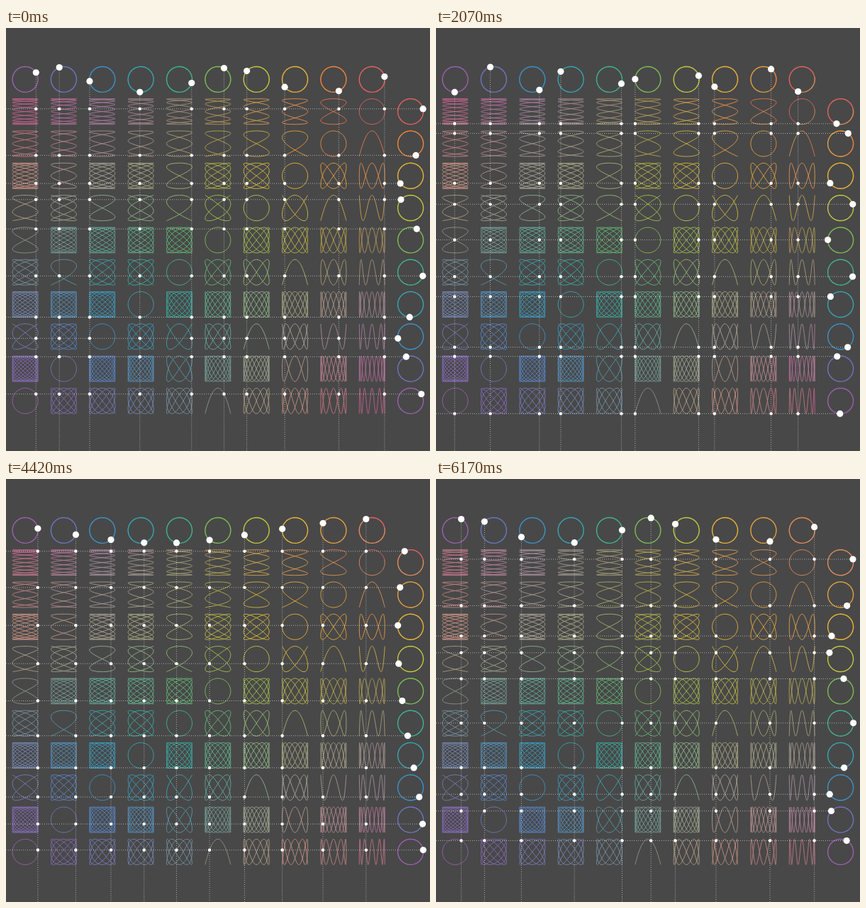
Animation, 598 px wide and 596 px high, one loop 6.28 s. Source, as an HTML page with a canvas:

```html
<!DOCTYPE html>
<html>
<head>
<meta charset="utf-8">
<title>Lissajous table</title>
<style>
html, body { margin: 0; width: 100%; height: 100%; overflow: hidden; background: #484848; }
canvas { display: block; }
</style>
</head>
<body>
<canvas id="stage" width="598" height="596"></canvas>
<script>
const ctx = document.getElementById('stage').getContext('2d');
const LOOP = 6280, STEPS = 81, N = 10, R = 18, TAU = Math.PI * 2;
const START = 1.357, TURN = 0.0779;

// purple to red; strokes already passed in this loop take warmer tints of the last two
const early = ['#9b5faf', '#6c76be', '#3e91c8', '#37a5b4', '#41b491', '#7dbe55', '#c3c841', '#ebb437', '#ee873c', '#e4625f'].map(rgb);
const late = [...early.slice(0, 8), rgb('#e4a041'), rgb('#e18c5a')];

function rgb(hex) {
  return [1, 3, 5].map(i => parseInt(hex.slice(i, i + 2), 16));
}

function blend(palette, i, j) {
  return `rgb(${palette[i].map((v, n) => Math.round(Math.hypot(v, palette[j][n]) / Math.SQRT2))})`;
}

const gcd = (a, b) => b ? gcd(b, a % b) : a;
const colX = c => 27.1 + 54.35 * c;
const rowY = r => 72.4 + 45.3 * (r + 1);
const waveX = (f, a) => R * Math.sin(f * a);
const waveY = (f, a) => -R * Math.cos(f * a);

function trace(cx, cy, fx, fy, from, to, color) {
  const n = Math.ceil((to - from) * Math.max(fx, fy) * 8);
  if (n < 1) return;
  ctx.strokeStyle = color;
  ctx.beginPath();
  for (let i = 0; i <= n; i++) {
    const a = from + (to - from) * i / n;
    ctx.lineTo(cx + waveX(fx, a), cy + waveY(fy, a));
  }
  ctx.stroke();
}

function curve(cx, cy, fx, fy, angle, width) {
  const g = gcd(fx, fy);
  // open curves run back over themselves, so half a period covers them
  const open = fx / g % 2 === 1 && fy / g % 2 === 0;
  const length = (open ? Math.PI : TAU) / g;
  const from = open ? -length / 2 : START;
  const now = from + Math.min(angle - START, length);
  ctx.lineWidth = width;
  trace(cx, cy, fx, fy, now, from + length, blend(early, N - fx, N - fy));
  trace(cx, cy, fx, fy, from, now, blend(late, N - fx, N - fy));
}

function dot(x, y, r) {
  ctx.beginPath();
  ctx.arc(x, y, r, 0, TAU);
  ctx.fill();
}

function dotted(x0, y0, x1, y1) {
  ctx.beginPath();
  ctx.moveTo(x0, y0);
  ctx.lineTo(x1, y1);
  ctx.stroke();
}

function draw(angle) {
  ctx.fillStyle = '#484848';
  ctx.fillRect(0, 0, 598, 596);

  const top = rowY(-1), right = colX(N), xs = [], ys = [];
  for (let k = 0; k < N; k++) {
    const fx = N - k, fy = k + 1;
    xs.push(colX(k) + waveX(fx, angle));
    ys.push(rowY(k) + waveY(fy, angle));
    curve(colX(k), top, fx, fx, angle, 1.4);
    curve(right, rowY(k), fy, fy, angle, 1.4);
    for (let r = 0; r < N; r++) curve(colX(k), rowY(r), fx, r + 1, angle, 0.9);
  }

  ctx.lineWidth = 1;
  ctx.strokeStyle = 'rgba(255,255,255,.55)';
  ctx.setLineDash([1, 2]);
  for (let k = 0; k < N; k++) {
    dotted(xs[k], top + waveY(N - k, angle), xs[k], 596);
    dotted(0, ys[k], right + waveX(k + 1, angle), ys[k]);
  }
  ctx.setLineDash([]);

  ctx.fillStyle = '#fff';
  for (let k = 0; k < N; k++) {
    dot(xs[k], top + waveY(N - k, angle), 4.6);
    dot(right + waveX(k + 1, angle), ys[k], 4.6);
    for (const y of ys) dot(xs[k], y, 2.2);
  }
}

let shown = -1;
function tick() {
  const phase = performance.now() % LOOP / LOOP;
  const step = Math.min(Math.round(phase * STEPS), STEPS - 1);
  if (step !== shown) draw(START + TURN * step);
  shown = step;
  requestAnimationFrame(tick);
}
tick();
</script>
</body>
</html>
```
